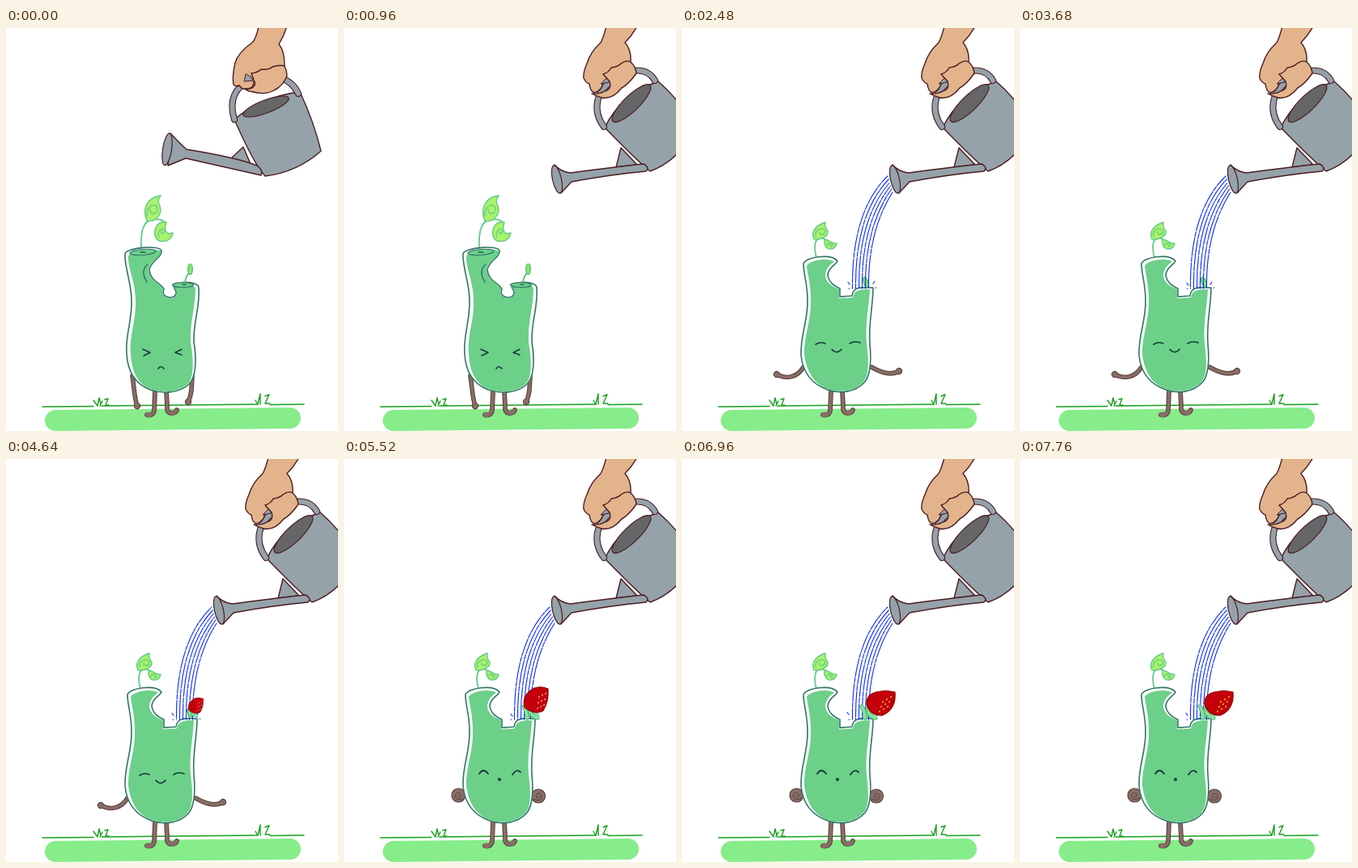
An HTML page with a canvas for the animation above (7840 ms loop, 410 px wide and 498 px high).

```html
<!DOCTYPE html>
<html lang="en">
<head>
<meta charset="utf-8">
<title>Watering the sprout</title>
<style>
html, body { margin: 0; height: 100%; overflow: hidden; background: #fff; }
canvas { display: block; }
</style>
</head>
<body>
<canvas id="stage" width="410" height="498"></canvas>
<script>
const ctx = document.getElementById('stage').getContext('2d');
const LOOP = 7840, STEP = 80;
const HOLDS = [80, 480, 720, 880, 1120, 1520, 3360, 3760, 4400, 6800, 7200, 7600];
const DARK = '#4a1c22', METAL = '#95a2a9', SKIN = '#e3b48b', TEAL = '#2f7566',
      GREEN = '#6cd089', LIME = '#a9f26c', BROWN = '#8a6d67', BARK = '#57443f',
      INK = '#163e3a', BLUE = '#0b2cf5';

const ramp = (t, from, to) => Math.max(0, Math.min(1, (t - from) / (to - from)));
const mix = (a, b, k) => a + (b - a) * k;

// Blend two paths that share the same commands
function morph(a, b, k) {
  const target = b.match(/-?[\d.]+/g);
  let i = 0;
  return a.replace(/-?[\d.]+/g, n => mix(+n, +target[i++], k));
}

function draw(d, fill, stroke, width = 1.4) {
  const path = new Path2D(d);
  if (fill) { ctx.fillStyle = fill; ctx.fill(path); }
  if (stroke) { ctx.strokeStyle = stroke; ctx.lineWidth = width; ctx.stroke(path); }
}

function oval(x, y, rx, ry, angle, fill, stroke, width = 1.2) {
  ctx.beginPath();
  ctx.ellipse(x, y, rx, ry, angle, 0, 7);
  ctx.fillStyle = fill;
  ctx.fill();
  if (stroke) { ctx.strokeStyle = stroke; ctx.lineWidth = width; ctx.stroke(); }
}

function tube(d, color, edge, width) {
  draw(d, null, edge, width + 2.2);
  draw(d, null, color, width);
}

function ground() {
  draw('M61,485 L351,482', null, '#87ec8a', 26);
  draw('M45,468 L108,467.5 M118,467 L311,465 M326,465.5 L368,465', null, '#16a01c', 1.5);
  draw('M108,460 L113,467 L115,457 L117,465 L119,461 L116,467 M122,459 L126,458 L123,466 L127,466' +
       'M308,460 L311,465 L314,452 L314,465 M320,455 L325,453 L320,464 L326,464', null, '#16a01c', 1.4);
}

function can(k) {
  const m = (a, b) => morph(a, b, k);
  draw(m('M278,161 L293,147 L302,168Z', 'M336,172 L342,148 L362,169Z'), METAL, DARK);
  draw(m('M282,113 Q315,85 363,79 Q380,115 389,152 Q360,178 320,183 Q306,168 282,113Z',
         'M322,123 Q342,82 388,66 Q418,92 433,124 Q414,164 378,177 Q366,168 322,123Z'), METAL, DARK);
  oval(mix(321, 355, k), mix(97, 93, k), mix(30, 32, k), mix(8, 9.5, k), mix(-.36, -.77, k), '#666668', DARK);
  draw(m('M203,130 Q214,142 223,150 Q285,160 310,170 Q318,176 315,182 Q270,172 222,161 L200,170Z',
         'M260,169 Q268,178 280,179 Q340,171 370,168 Q378,172 373,177 Q330,181 281,190 L268,204Z'), METAL, DARK);
  oval(mix(199, 263, k), mix(150, 187, k), 5.5, mix(20, 17.5, k), mix(.15, -.22, k), METAL, DARK);
  tube(m('M282,113 C275,90 282,72 304,64 C325,56 351,59 361,81',
         'M321,122 C306,102 311,76 334,64 C350,50 374,47 384,65'), METAL, DARK, 6);
  draw(m('M312,-2 Q309,13 304,18 Q286,31 283,43 Q279,60 281,70 Q284,73 288,71 Q292,77 299,75 Q306,74 306,66' +
         'L318,60 L344,46 Q344,28 337,20 Q343,10 347,-2Z',
         'M324,-2 Q320,13 317,18 Q304,30 300,44 Q295,55 296,62 Q299,68 303,69 Q304,78 309,80 Q318,78 320,68' +
         'L330,60 L354,42 Q355,27 347,18 Q356,9 362,-2Z'), SKIN, DARK);
  draw(m('M296,57 L294,66 L305,65 L303,61Z', 'M325,61 L317,69 L327,67 L328,62Z'), METAL, DARK, 1);
  draw(m('M303,56 Q311,55 315,51 Q325,52 329,48 Q338,45 344,47 Q347,53 347,59 Q342,72 331,77 Q321,83 305,79 Q298,78 295,75 Q304,76 306,72 Q309,69 306,64Z',
         'M320,57 Q327,55 330,49 Q338,48 342,44 Q349,39 354,42 Q360,47 361,56 Q351,70 343,74 Q331,89 318,86 Q311,84 306,81 Q316,82 322,78 Q331,76 328,66Z'),
       SKIN, DARK);
}

function water(t, frame) {
  const reach = ramp(t, 960, 1520);
  if (!reach) return;
  ctx.save();
  ctx.beginPath();
  ctx.rect(180, 170, 110, 153 * reach);
  ctx.clip();
  for (let i = 0; i < 6; i++) {
    const x = 254 + i * 1.2, y = 183 + i * 4, end = 210.5 + i * 4;
    ctx.setLineDash([22 + i % 3 * 9, 1.5, 6, 1.5]);
    ctx.lineDashOffset = -frame * 7 - i * 11;
    draw(`M${x},${y} Q${end - 1},${226 + i * 5} ${end},322`, null, BLUE, 1.1);
  }
  ctx.restore();
  if (reach < 1) return;
  const hop = frame % 3;
  draw(`M${208 - hop},${318 - hop} l-2,-3 M207,322 l-1,0 M${235 + hop},${317 - hop} l2,-3 M239,321 l1,0`,
       null, BLUE, 1.1);
}

function sprout(k) {
  const m = (a, b) => morph(a, b, k), edge = '#62cc86';
  draw(m('M167,274 C166,252 169,237 182,237 C190,235 196,238 197,243',
         'M166,284 C163,272 163,261 170,260 C174,259 176,260 178,263'), null, edge, 1.8);
  draw(m('M191,207 C176,209 167,222 174,238 C184,241 194,230 190,220 C187,214 188,211 191,207Z',
         'M177,240 C168,243 158,250 163,261 C172,262 181,257 180,251 C177,247 176,244 177,240Z'), LIME, edge);
  draw(m('M198,240 C186,238 179,252 187,262 C196,266 205,262 206,253 C200,256 194,252 198,240Z',
         'M176,261 C175,267 178,274 184,273 C188,273 190,270 191,266 C186,268 183,262 176,261Z'), LIME, edge);
  draw(m('M174,232 C172,220 186,214 187,224 C187,231 177,231 178,224 M189,258 C186,250 194,245 196,251 C195,256 190,254 192,251',
         'M165,257 C163,249 174,245 177,251 C176,256 169,257 170,252 M179,268 C182,264 186,267 186,269 C185,271 183,270 183,268'),
       null, edge, 1.3);
}

function limbs(t) {
  tube('M184,449 L183,473 Q181,480 174,478', BROWN, BARK, 3.6);
  tube('M198,449 L199,467 Q198,475 204,476 Q210,476 211,472', BROWN, BARK, 3.6);
  oval(176, 478, 3.6, 3.4, 0, BROWN);
  oval(207, 475, 4, 3.2, -.5, BROWN);
  if (t >= 5200) {
    for (const [x, y, side] of [[141.5, 415.5, 1], [240, 416.5, -1]]) {
      oval(x, y, 8.5, 8.5, 0, BROWN, BARK);
      draw(`M${x + 6 * side},${y + 4} Q${x - 5 * side},${y + 8} ${x - 4 * side},${y - 1}` +
           `Q${x + side},${y - 6} ${x + 3 * side},${y} q${-2 * side},4 ${-4 * side},1`, null, BARK, 1);
    }
    return;
  }
  const k = ramp(t, 1520, 2400);
  const arms = [
    ['M156,430 C158,440 158,455 162,467', 'M150,419 C143,431 130,435 117,428'],
    ['M230,430 C229,443 230,452 225,462', 'M234,419 C246,426 258,430 268,424']
  ];
  for (const [down, out] of arms) {
    const arm = morph(down, out, k), [x, y] = arm.match(/[\d.]+/g).slice(-2).map(Number);
    oval(x, y, 3.6, 3.6, 0, BROWN, BARK);
    tube(arm, BROWN, BARK, 3.4);
    oval(x, y, 3, 3, 0, BROWN);
  }
}

function body(k) {
  draw(morph(
    'M147,279 C149,271 190,268 192,275 C193,284 178,288 177,299 C178,313 193,316 195,323 C192,329 197,333 203,333 ' +
    'C210,333 212,327 208,322 C202,313 238,311 238,321 C240,345 231,362 232,388 C236,412 234,432 226,440 ' +
    'C214,452 192,452 178,447 C160,440 150,425 149,402 C147,380 156,362 155,336 C155,315 146,295 147,279Z',
    'M150,291 C153,283 184,278 192,288 C190,293 181,295 180,305 C181,315 189,319 195,322 C195,325 195,328 195,332 ' +
    'C200,332 205,331 210,331 C211,320 220,320 236,321 C236,343 230,365 232,390 C234,412 233,428 226,437 ' +
    'C214,451 194,452 180,447 C160,440 149,425 147,404 C146,380 156,360 155,336 C155,315 150,305 150,291Z', k),
    '#fff', TEAL, 1.6);
  draw(morph(
    'M151,282 C153,274 190,272 191,276 C192,284 177,288 176,299 C177,313 193,316 194,323 C191,329 197,334 203,334 ' +
    'C211,334 213,327 209,322 C204,315 234,315 234,322 C234,345 227,362 228,388 C232,412 232,432 225,439 ' +
    'C214,451 192,451 178,446 C163,440 155,425 154,402 C152,380 161,362 160,336 C160,315 150,295 151,282Z',
    'M154,294 C157,287 181,283 188,289 C180,293 175,303 178,310 C181,318 189,320 194,323 C194,327 194,330 194,334 ' +
    'C200,334 206,333 211,333 C212,324 219,323 232,323 C231,345 226,365 228,390 C231,412 231,428 225,436 ' +
    'C214,450 194,451 180,446 C163,440 154,425 151,404 C150,382 160,360 159,336 C159,315 155,305 154,294Z', k),
    GREEN);
  if (k) return;
  oval(169, 277, 16, 3.5, -.08, GREEN, TEAL);
  oval(169, 277, 4, 1, 0, TEAL);
  oval(218.5, 317.5, 13, 3, 0, GREEN, TEAL);
  oval(220, 317, 3, 1, 0, TEAL);
  draw('M175,292 C168,298 169,306 174,314', null, TEAL);
}

function face(t) {
  if (t < 1600) {
    draw('M169,397 L178,401 L170,405 M217,397 L209,401 L217,404 M188,421 Q191,416 195,421', null, INK, 1.6);
  } else if (t < 5200) {
    draw('M165,391 Q171,387 177,390 M207,390 Q213,386 220,389 M185,397 Q191,404 197,397', null, INK, 1.6);
  } else {
    draw('M167,389 Q172,381 178,389 M208,390 Q213,382 218,387', null, INK, 1.8);
    oval(192, 396, 2, 2, 0, INK);
  }
}

function bud(k) {
  draw(morph('M221,315 Q222,306 226,303', 'M230,321 Q229,319 228,318', k), null, '#4fb873', 1.6);
  oval(mix(227.5, 227, k), mix(298, 314, k), 2.8, 6.5, mix(0, -.35, k), '#8be56c', '#4fb873');
}

function strawberry(t) {
  const size = ramp(t, 3760, 5200), k = ramp(t, 5520, 6080);
  if (!size) return;
  ctx.save();
  ctx.translate(230, 316);
  ctx.scale(size, size);
  ctx.translate(-230, -316);
  tube('M222,306 Q226,312 226,320', '#8be3a0', '#55bd7d', 3);
  tube('M229,309 Q239,314 239,320 Q234,319 230,313', '#8be3a0', '#55bd7d', 3);
  draw(morph('M252,284 Q253,300 246,311 Q236,317 223,307 Q220,295 228,288 Q238,278 252,284Z',
             'M263,288 Q265,309 247,317 Q231,316 228,303 Q227,291 240,288 Q252,285 263,288Z', k),
       '#c4000b', '#8c000c', 1.2);
  for (let i = 0; i < 9; i++) {
    const row = i % 3, col = (i - row) / 3;
    oval(mix(249 - row * 4 - col, 258 - row * 5 - col * 2, k), mix(290 + col * 7 + row * 2, 294 + col * 6 + row * 3, k),
         .8, 1.2, .6, k < .5 ? '#f29aa0' : '#e9c034');
  }
  ctx.restore();
}

function render(now) {
  let t = Math.floor(now % LOOP / STEP) * STEP;
  if (HOLDS.includes(t)) t -= STEP;
  const frame = t / STEP - HOLDS.filter(h => h < t).length;
  const joy = ramp(t, 1520, 2000);
  ctx.clearRect(0, 0, 410, 498);
  ctx.lineCap = ctx.lineJoin = 'round';
  ground();
  limbs(t);
  sprout(joy);
  body(joy);
  face(t);
  bud(joy);
  water(t, frame);
  strawberry(t);
  can(ramp(t, 80, 880));
}

const start = performance.now();
function tick() {
  render(performance.now() - start);
  requestAnimationFrame(tick);
}
tick();
</script>
</body>
</html>
```
